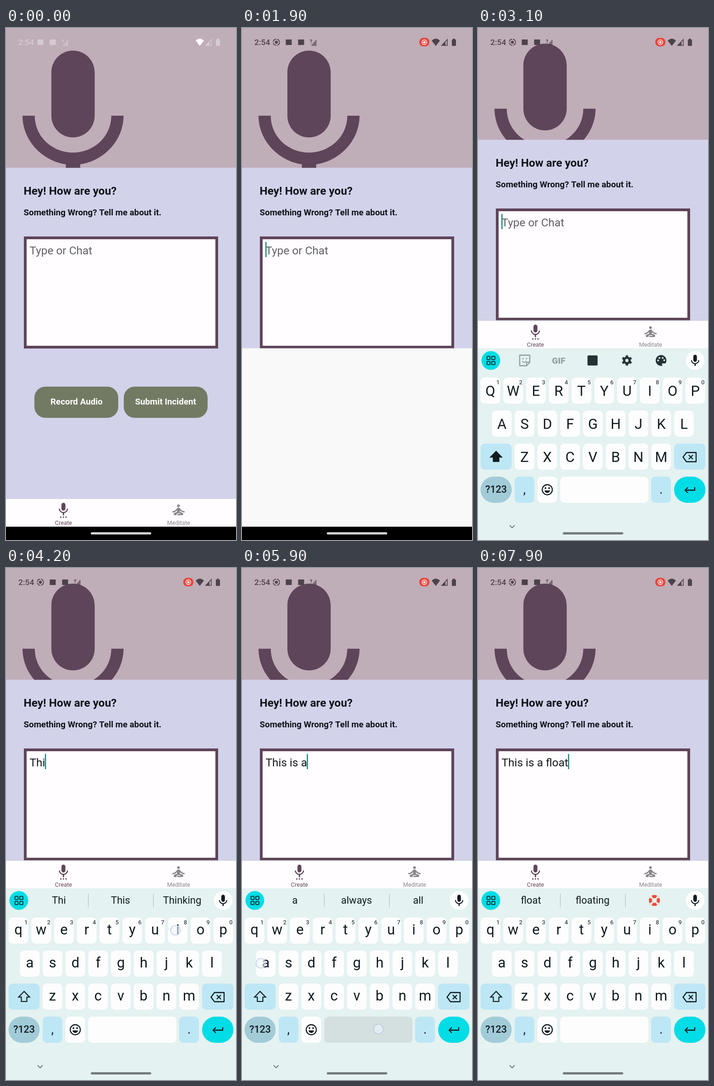
An HTML page with a canvas for the animation above (8 s loop, 502 by 1115 pixels).

```html
<!DOCTYPE html>
<html lang="en">
<head>
<meta charset="utf-8">
<title>Voice journal</title>
<style>
  html, body { margin: 0; width: 100%; height: 100%; overflow: hidden; }
  canvas { display: block; width: 502px; height: 1115px; }
</style>
</head>
<body>
<canvas id="stage"></canvas>
<script>
const W = 502, H = 1115, LOOP = 8000, STEP = 100;
const canvas = document.getElementById('stage');
const ratio = window.devicePixelRatio || 1;
canvas.width = W * ratio;
canvas.height = H * ratio;
const c = canvas.getContext('2d');

const PLUM = '#5f4559', INK = '#10131a', WHITE = '#fffdff', KEYBOARD = '#e4f2f1';
const LIGHT_BLUE = '#bee7f5', CYAN = '#00dde6', KEY_INK = '#101b20';

const micShape = new Path2D('M12 14c1.66 0 3-1.34 3-3V5c0-1.66-1.34-3-3-3S9 3.34 9 5v6c0 1.66 1.34 3 3 3z' +
  'M17.3 11c0 3-2.54 5.1-5.3 5.1S6.7 14 6.7 11H5c0 3.41 2.72 6.23 6 6.72V21h2v-3.28c3.28-.48 6-3.3 6-6.72z');
const yogaShape = new Path2D('M14 6a2 2 0 1 1-4 0a2 2 0 1 1 4 0z' +
  'M21 16v-2c-2.24 0-4.16-.96-5.6-2.68l-1.34-1.6A1.98 1.98 0 0 0 12.53 9h-1.05c-.61 0-1.17.26-1.55.72' +
  'l-1.34 1.6C7.16 13.04 5.24 14 3 14v2c2.77 0 5.19-1.17 7-3.25V15l-3.88 1.55c-.67.27-1.12.93-1.12 1.66' +
  'C5 19.2 5.8 20 6.79 20H9v-.5a2.5 2.5 0 0 1 2.5-2.5h3c.28 0 .5.22.5.5s-.22.5-.5.5h-3c-.83 0-1.5.67-1.5 1.5' +
  'v.5h7.1c.85 0 1.65-.54 1.85-1.37.21-.89-.27-1.76-1.08-2.08L14 15v-2.25c1.81 2.08 4.23 3.25 7 3.25z');

// time, character, horizontal offset of the finger from the key centre
const strokes = [
  [3400, 'T', -8], [3800, 'h', -6], [4100, 'i', -5], [4400, 's', -8], [4600, ' ', 22],
  [5100, 'i', -5], [5300, 's', -8], [5700, ' ', 22], [5800, 'a', -11], [6400, ' ', 22],
  [6600, 'f', -8], [6900, 'l', -8], [7100, 'o', -6], [7300, 'a', -11], [7500, 't', -6]
];
const hints = {
  'T': 'T,The,This', 'Th': 'Th,The,This', 'Thi': 'Thi,This,Thinking', 'This': 'This,Thus,Thistle',
  'This ': 'app,is,audio', 'This i': 'i,is,in', 'This is': 'is,isn\'t,issue', 'This is ': 'a,the,not',
  'This is a': 'a,always,all', 'This is a ': 'good,great,very', 'This is a f': 'f,few,for',
  'This is a fl': 'fl,flat,flower', 'This is a flo': 'flo,flower,float',
  'This is a floa': 'floa,float,floating', 'This is a float': 'float,floating,*'
};
const FOCUS = 1800, SLIDE = 2100, SHRINK = 2300, TOUCH = 300;

const keys = {};
function addRow(letters, x, y) {
  [...letters].forEach((ch, i) => keys[ch] = { x: x + i * 49.7, y, w: 43, h: 57 });
}
addRow('qwertyuiop', 5.5, 761);
addRow('asdfghjkl', 30.5, 833);
addRow('zxcvbnm', 80, 905);
keys[' '] = { x: 179.5, y: 977, w: 192.5, h: 57 };

const clamp = v => Math.max(0, Math.min(1, v));
const ramp = (t, a, b) => clamp((t - a) / (b - a));
const easeOut = p => 1 - (1 - p) ** 3;
const mix = (a, b, p) => `rgb(${a.map((v, i) => Math.round(v + (b[i] - v) * p))})`;

function rect(x, y, w, h, color) {
  c.fillStyle = color;
  c.fillRect(x, y, w, h);
}
function round(x, y, w, h, r, color) {
  c.fillStyle = color;
  c.beginPath();
  c.roundRect(x, y, w, h, r);
  c.fill();
}
function disc(x, y, r, color) {
  c.fillStyle = color;
  c.beginPath();
  c.arc(x, y, r, 0, 7);
  c.fill();
}
function ring(x, y, r, width, color) {
  c.strokeStyle = color;
  c.lineWidth = width;
  c.beginPath();
  c.arc(x, y, r, 0, 7);
  c.stroke();
}
function trace(points, closed) {
  c.beginPath();
  points.forEach(([x, y]) => c.lineTo(x, y));
  if (closed) c.closePath();
}
function polygon(points, color) {
  trace(points, true);
  c.fillStyle = color;
  c.fill();
}
function line(points, width, color, closed) {
  trace(points, closed);
  c.strokeStyle = color;
  c.lineWidth = width;
  c.stroke();
}
function text(str, x, y, size, color, weight = 400, align = 'left') {
  c.font = `${weight} ${size}px Roboto, sans-serif`;
  c.textAlign = align;
  c.fillStyle = color;
  c.fillText(str, x, y);
}
function shape(path, x, y, scale, color) {
  c.save();
  c.translate(x, y);
  c.scale(scale, scale);
  c.fillStyle = color;
  c.fill(path);
  c.restore();
}

function drawStatus(t) {
  const dark = ramp(t, 100, 500), shift = easeOut(ramp(t, 300, 700));
  const ink = mix([213, 203, 211], [76, 66, 75], dark);
  text('2:54', 27, 37, 17.4, ink, 500);

  c.globalAlpha = shift;
  c.setLineDash([9, 2]);
  ring(75, 31, 6.8, 1.8, ink);
  c.setLineDash([]);
  disc(75, 31, 3.2, ink);
  round(387, 21.5, 22, 18.5, 8.5, '#e8453c');
  ring(398, 31, 5.2, 1.4, '#fff');
  disc(398, 31, 2.6, '#fff');
  c.globalAlpha = 1;

  const dx = shift * 27;
  rect(68.5 + dx, 25, 13, 12, ink);
  rect(95.5 + dx, 25, 13, 12, ink);
  text('?', 121 + dx, 33, 11, ink, 700);
  for (let i = 0; i < 4; i++) rect(125.5 + dx + i * 2.7, 35 - i * 3, 1.6, 4 + i * 3, ink);

  c.fillStyle = mix([255, 255, 255], [76, 66, 75], dark);
  c.beginPath();
  c.moveTo(423, 39);
  c.lineTo(414, 27.5);
  c.quadraticCurveTo(423, 19, 432, 27.5);
  c.fill();
  line([[436, 38], [448, 38], [448, 25]], 1.6, ink, true);
  polygon([[436, 38], [444, 38], [444, 29.5]], ink);
  round(458, 25, 9, 14, 1.5, ink);
  rect(460.5, 23, 4, 3, ink);
}

function drawTabs(y) {
  rect(0, y - 1, W, 1, '#c9c9df');
  rect(0, y, W, 61, WHITE);
  shape(micShape, 108.2, y + 5.6, 1.43, PLUM);
  for (let i = 0; i < 3; i++) rect(118.2 + i * 5.7, y + 38.3, 2.9, 2.7, PLUM);
  text('Create', 125.5, y + 56.5, 12.8, PLUM, 400, 'center');
  shape(yogaShape, 358.7, y + 6, 1.48, '#89858a');
  text('Meditate', 376.7, y + 56.5, 12.8, '#89858a', 400, 'center');
}

function drawPage(t, typed, lastEdit) {
  const shrunk = t >= SHRINK, focused = t >= FOCUS;
  const up = shrunk ? 61 : 0, head = 304.5 - up;
  rect(0, 0, W, H, '#d2d2ea');
  c.save();
  c.beginPath();
  c.rect(0, 0, W, head);
  c.clip();
  rect(0, 0, W, head, '#bfadb8');
  shape(micShape, -42.7, 17.7 - up / 4, 15.75, PLUM);
  c.restore();

  text('Hey! How are you?', 38.5, 362.5 - up, 24.4, INK, 700);
  text('Something Wrong? Tell me about it.', 38.5, 408 - up, 18.75, INK, 700);
  rect(39, 454 - up, 424, 244, PLUM);
  rect(45, 460 - up, 412, 232, WHITE);
  const base = 492.5 - up;
  text(typed || 'Type or Chat', 51.5, base, 24.4, typed ? '#17191c' : '#626064');
  if (focused && (t - lastEdit) % 1000 < 500) {
    c.font = '400 24.4px Roboto, sans-serif';
    rect(51 + c.measureText(typed).width, 466 - up, 2.5, 33, '#14877c');
  }

  round(62, 781, 183, 68, 24, '#737a63');
  round(257, 781, 183, 68, 24, '#737a63');
  text('Record Audio', 154, 820, 18.8, '#fff', 700, 'center');
  text('Submit Incident', 348.3, 820, 18.8, '#fff', 700, 'center');

  if (focused) rect(0, 697.5, W, H, '#f9f9fa');
  if (!focused) drawTabs(1025.5);
  if (shrunk) drawTabs(637.5);
  rect(0, 1086, W, 29, '#000');
  round(185, 1098, 132, 5, 2.5, '#d0d0d0');
}

function drawLifebuoy(x, y) {
  ring(x, y, 8.7, 6.5, '#ec4a37');
  c.lineWidth = 6.5;
  c.strokeStyle = '#f4e6e2';
  for (let i = 0; i < 4; i++) {
    const a = Math.PI / 4 + i * Math.PI / 2;
    c.beginPath();
    c.arc(x, y, 8.7, a - .26, a + .26);
    c.stroke();
  }
}

function drawTools() {
  const grey = '#939e9f', dark = '#263236';
  c.lineJoin = 'round';
  line([[91, 712.5], [113, 712.5], [113, 728], [106, 735.5], [91, 735.5]], 2.4, grey, true);
  line([[113, 728], [106, 728], [106, 735]], 2, grey);
  disc(98, 720, 1.6, grey);
  disc(106, 720, 1.6, grey);
  c.beginPath();
  c.arc(101, 723, 5, .4, 2.6);
  c.stroke();
  text('GIF', 176, 731, 19, grey, 900, 'center');
  round(239, 713, 22, 22, 2, dark);

  ring(325, 724, 6, 5, dark);
  c.lineWidth = 5;
  for (let i = 0; i < 6; i++) {
    const a = i * Math.PI / 3 + Math.PI / 6 + Math.PI / 3;
    line([[325 + 7 * Math.cos(a), 724 + 7 * Math.sin(a)],
      [325 + 11.2 * Math.cos(a), 724 + 11.2 * Math.sin(a)]], 5, dark);
  }

  disc(399.5, 724, 11.7, dark);
  disc(406, 732, 4.4, KEYBOARD);
  round(401, 726, 9, 4.5, 2.2, dark);
  [[393, 724], [396, 718.5], [403, 718.5], [406.5, 723.5]].forEach(([x, y]) => disc(x, y, 1.9, KEYBOARD));
}

function drawHints(typed) {
  rect(179, 709, 1.2, 30, '#b4c2c2');
  rect(321, 709, 1.2, 30, '#b4c2c2');
  hints[typed].split(',').forEach((word, i) => {
    const x = [115.5, 250, 384.5][i];
    if (word === '*') drawLifebuoy(x + .5, 724);
    else text(word, x, 731, 22, KEY_INK, 400, 'center');
  });
}

function drawKeyboard(t, typed) {
  const upper = !typed, touches = strokes.filter(([at]) => t >= at && t < at + TOUCH);
  c.save();
  c.translate(0, Math.round((1 - easeOut(ramp(t, SLIDE - STEP, SLIDE + 300))) * 418));
  rect(0, 697.5, W, H, KEYBOARD);
  disc(28, 724, 20.5, CYAN);
  for (const x of [19.5, 30]) for (const y of [715, 726]) {
    c.strokeStyle = '#123b40';
    c.lineWidth = 2;
    c.beginPath();
    c.roundRect(x, y, 7, 7, 1.5);
    c.stroke();
  }
  if (typed) drawHints(typed); else drawTools();
  disc(474, 724, 20.5, '#fdfefe');
  shape(micShape, 458.4, 709, 1.29, KEY_INK);

  Object.entries(keys).forEach(([ch, k]) => {
    const held = ch === ' ' && touches.some(s => s[1] === ' ');
    round(k.x, k.y, k.w, k.h, 9, held ? '#d3e0df' : '#fdfdfe');
    text(upper ? ch.toUpperCase() : ch, k.x + k.w / 2, k.y + (upper ? 39.5 : 37), 31, KEY_INK, 400, 'center');
  });
  [...'1234567890'].forEach((d, i) => text(d, 43.7 + i * 49.7, 775.5, 13, '#3c4a50', 500, 'center'));

  round(5.5, 905, 68, 57, 9, LIGHT_BLUE);
  const arrow = [[39.5, 922], [51.5, 934.5], [45.5, 934.5], [45.5, 944], [33.5, 944], [33.5, 934.5], [27.5, 934.5]];
  c.lineJoin = 'miter';
  if (upper) polygon(arrow, KEY_INK);
  line(arrow, 2.2, KEY_INK, true);

  round(428, 905, 68.5, 57, 9, LIGHT_BLUE);
  c.lineJoin = 'round';
  line([[447.5, 934.5], [455, 924.5], [476, 924.5], [476, 944.5], [455, 944.5]], 2.3, KEY_INK, true);
  line([[460, 930], [469, 939]], 2.3, KEY_INK);
  line([[469, 930], [460, 939]], 2.3, KEY_INK);

  round(5.5, 977, 68, 57, 28.5, '#a2cbd8');
  text('?123', 39.5, 1012, 21.5, KEY_INK, 500, 'center');
  round(80, 977, 43, 57, 9, LIGHT_BLUE);
  text(',', 101.5, 1014, 27, KEY_INK, 400, 'center');
  round(129.7, 977, 43, 57, 9, '#fdfdfe');
  ring(151.2, 1005.5, 11, 2.3, KEY_INK);
  disc(147.2, 1002, 1.9, KEY_INK);
  disc(155.2, 1002, 1.9, KEY_INK);
  c.fillStyle = KEY_INK;
  c.beginPath();
  c.arc(151.2, 1006.5, 6, .1, Math.PI - .1);
  c.fill();
  round(378, 977, 43, 57, 9, LIGHT_BLUE);
  text('.', 399.5, 1014, 27, KEY_INK, 400, 'center');
  round(428, 977, 68.5, 57, 28.5, CYAN);
  c.lineJoin = 'miter';
  line([[473, 1000], [473, 1006.5], [452, 1006.5]], 2.3, KEY_INK);
  line([[458, 1000.5], [452, 1006.5], [458, 1012.5]], 2.3, KEY_INK);
  line([[69, 1083], [74.5, 1088.5], [80, 1083]], 1.8, '#6c7878');
  round(185, 1098, 132, 5, 2.5, '#747b7c');

  touches.forEach(([, ch, dx]) => {
    const k = keys[ch.toLowerCase()];
    drawTouch(k.x + k.w / 2 + dx, k.y + (ch === ' ' ? 27 : 28));
  });
  c.restore();
}

function drawTouch(x, y) {
  disc(x, y, 10.5, 'rgba(240,246,255,.55)');
  ring(x, y, 10.5, 1.2, '#adc3de');
}

function render(time) {
  const t = Math.floor(time % LOOP / STEP) * STEP;
  const done = strokes.filter(([at]) => t >= at);
  const typed = done.map(s => s[1]).join('');
  const lastEdit = done.length ? done[done.length - 1][0] : FOCUS;
  c.setTransform(ratio, 0, 0, ratio, 0, 0);
  drawPage(t, typed, lastEdit);
  if (t >= 1200 && t < 1500) drawTouch(250, 560);
  if (t >= SLIDE) drawKeyboard(t, typed);
  drawStatus(t);
}

const start = performance.now();
function tick() {
  render(performance.now() - start);
  requestAnimationFrame(tick);
}
tick();
</script>
</body>
</html>
```
